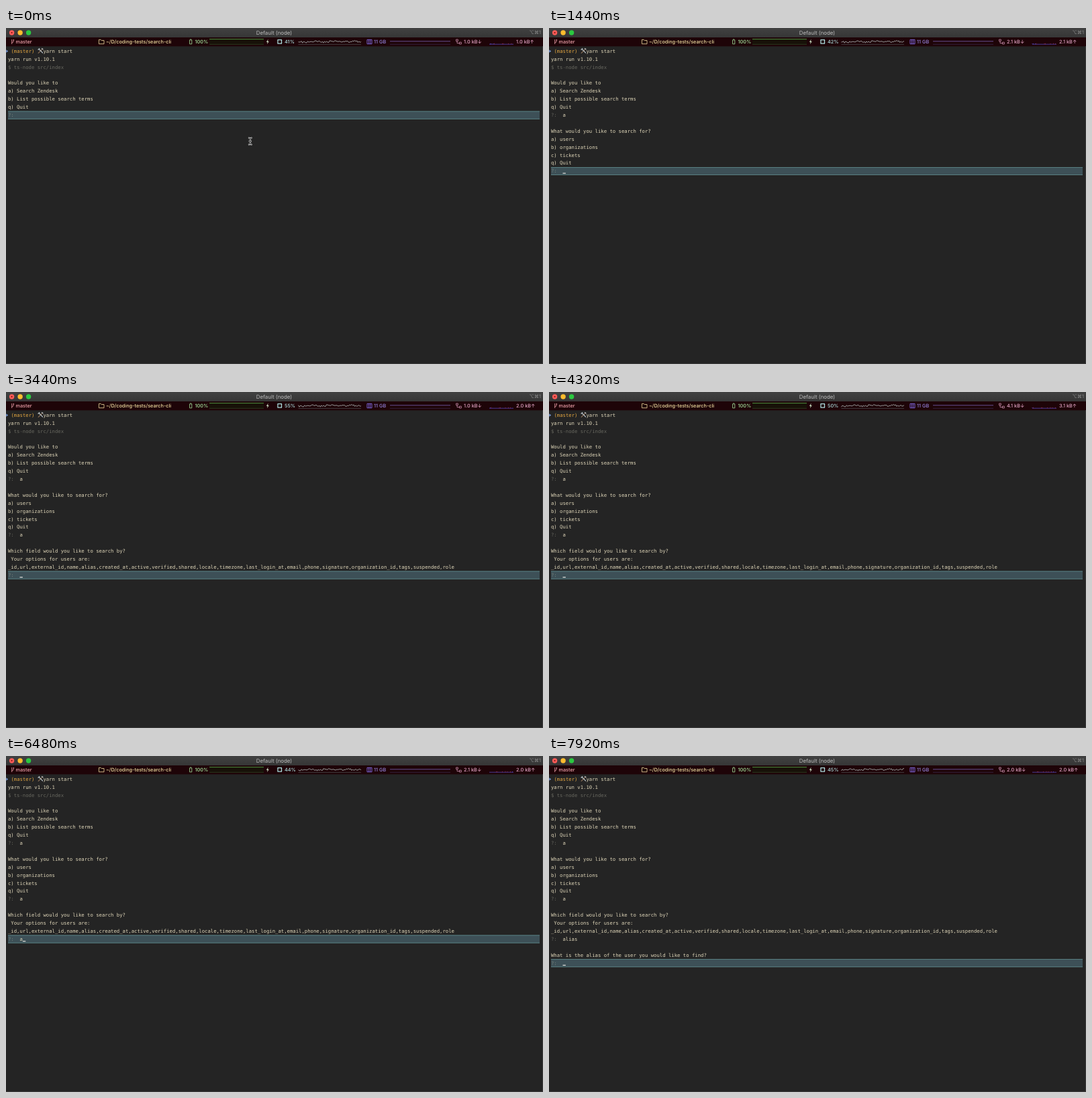
Animation, 800 px wide and 500 px high, one loop 8 s. Source, as an HTML page:

```html
<!DOCTYPE html>
<html lang="en">
<head>
<meta charset="utf-8">
<title>Terminal</title>
<style>
  html, body { margin: 0; width: 100%; height: 100%; overflow: hidden; background: #242424; }
  svg { display: block; width: 800px; height: 500px; }
  text { white-space: pre; text-rendering: geometricPrecision; }
  .mono { font: 7.27px "DejaVu Sans Mono", monospace; fill: #ded5b8; }
  .ui { font: 500 7.3px Inter, "DejaVu Sans", sans-serif; }
  .mono.dim { fill: #67675f; }
  .line { fill: none; stroke-width: .8; }
</style>
</head>
<body>
<svg id="stage" viewBox="0 0 800 500"></svg>
<script>
const LOOP = 8000, CHAR = 4.376, ROW = 11.9, LEFT = 3;
const NS = 'http://www.w3.org/2000/svg';
const stage = document.getElementById('stage');

function add(tag, attrs, text, parent = stage) {
  const el = document.createElementNS(NS, tag);
  for (const k in attrs) el.setAttribute(k, attrs[k]);
  if (text) el.textContent = text;
  parent.appendChild(el);
  return el;
}
const rect = (x, y, width, height, fill) => add('rect', { x, y, width, height, fill });
const path = (d, stroke, width = .8) =>
  add('path', { d, stroke, class: 'line', style: `stroke-width:${width}` });
const label = (x, text, fill) => add('text', { x, y: 23.3, fill, class: 'ui' }, text);
const baseline = row => 36.8 + row * ROW;
const mono = (row, text, parent, cls = '', x = LEFT) =>
  add('text', { x, y: baseline(row), class: 'mono ' + cls }, text, parent);
const show = (el, on) => { el.style.display = on ? '' : 'none'; };
const noise = n => {
  const v = Math.sin(n * 127.1 + 11.7) * 43758.5453;
  return v - Math.floor(v);
};

// Window
rect(0, 0, 800, 500, '#242424');
add('linearGradient', { id: 'bar', x2: 0, y2: 1 }).innerHTML =
  '<stop stop-color="#414141"/><stop offset="1" stop-color="#363636"/>';
rect(0, 0, 800, 14, 'url(#bar)');
rect(0, 14, 800, 13.3, '#1e0408');
rect(799, 27, 1, 473, '#3a3a3a');
rect(0, 499, 800, 1, '#3a3a3a');
['#fc5b57', '#fdbc2e', '#2bc840'].forEach((fill, i) =>
  add('circle', { cx: 8.6 + i * 12.5, cy: 7, r: 3.7, fill }));
add('circle', { cx: 8.6, cy: 7, r: 1.1, fill: '#7c1511' });
add('text', { x: 399.5, y: 9.8, fill: '#bdbdbd', class: 'ui', 'text-anchor': 'middle',
  style: 'font-size:7.9px;font-weight:400' }, 'Default (node)');
add('text', { x: 797, y: 9.4, fill: '#8c8c8c', class: 'ui', 'text-anchor': 'end',
  style: 'font-weight:400' }, '⌥⌘1');

// Status bar
const pink = '#f0a3ab', gold = '#f0dfa0', green = '#a4e59c', teal = '#abdcdc',
  violet = '#9583dc', rose = '#e2a4c4';
path('M8.7 17v7M8.7 22q2.6 0 2.6-3.6', pink);
add('circle', { cx: 11.3, cy: 17.9, r: .8, fill: pink });
label(14.5, 'master', pink);
path('M138.4 17.4h2.8l1 1.1h3.8v5.2h-7.6z', gold);
label(149, '~/D/coding-tests/search-cli', gold);
path('M273.6 17.8h3.2v6h-3.2zM274.5 16.8h1.4', green);
label(281.5, '100%', green);
rect(303, 16.5, 81, 8, '#171108');
path('M303 16.6H384', '#5cae4c');
path('M303 24.3H384', '#37552b', .6);
add('path', { d: 'M390.6 16.6l-2.7 4.3h1.8l-.8 3.4 2.9-4.5h-1.9z', fill: '#c9dcc0' });
path('M405 17.6h5.4v5.6h-5.4z', teal, 1.2);
path('M403.8 19h1M403.8 21.8h1M410.6 19h1M410.6 21.8h1', teal, .6);
const cpu = label(415, '', teal);
path('M435.5 24.4H529', '#596262', .6);
const cpuLine = path('', '#b9c6c4', .8);
path('M538 17.4h7v6.3h-7zM540.4 17.4v6.3M542.7 17.4v6.3', '#7860cf', 1);
label(548, '11 GB', violet);
path('M572 19.8H662', '#7663b5', .8);
path('M572 24.3H662', '#40355f', .6);
path('M670.6 17h2.7v2.7h-2.7zM675.5 21.2h2.8v2.7h-2.8zM672 19.8v2.8h3.4', rose, .7);
const down = label(682, '', rose);
path('M720 24.2H756', '#5547b8', .8);
const netBlue = path('', '#5c50d2', .7);
const netRed = path('', '#a53050', .7);
const up = label(760, '', rose);

// [start, cpu %, kB down, kB up]
const stats = [
  [0, 41, '1.0', '1.0'], [720, 42, '2.1', '2.1'], [1760, 48, '2.0', '1.0'],
  [2720, 55, '1.0', '2.0'], [3760, 50, '4.1', '3.1'], [4720, 41, '2.0', '2.0'],
  [5760, 44, '2.1', '2.0'], [6720, 46, '1.0', '1.0'], [7760, 45, '2.0', '2.0']
];

function drawStats(n) {
  const [, load, rx, tx] = stats[n];
  cpu.textContent = load + '%';
  down.textContent = rx + ' kB↓';
  up.textContent = tx + ' kB↑';
  const pts = [], blue = [], red = [];
  for (let i = 0; i <= 60; i++) {
    const k = i + n;
    const y = 20.2 + Math.sin(k * .33) * .7 + (noise(k) - .5) * 2.8;
    pts.push(`${(435.5 + i * 1.558).toFixed(2)} ${y.toFixed(2)}`);
  }
  for (let i = 0; i < 24; i++) {
    const h = noise(i + n + 90), x = 720 + i * 1.5;
    if (h > .72) (h > .88 ? red : blue).push(`M${x} 24v-${(h * 1.3).toFixed(2)}`);
  }
  cpuLine.setAttribute('d', 'M' + pts.join('L'));
  netBlue.setAttribute('d', blue.join(''));
  netRed.setAttribute('d', red.join(''));
}

// Shell prompt
add('path', { d: 'M.3 32.2l2.9 2.3-2.9 2.3z', fill: '#7898d6' });
add('text', { x: 7.4, y: baseline(0), class: 'mono', style: 'fill:#e0a441' }, '(master)');
path('M55 30.8L47.8 37.6', '#8a6e56', 1.3);
path('M49 31.2L55 37.4', '#b4bcc0', 1.3);
path('M47.6 32.4l2.6-2.2M53 30.2l2.4 1.8', '#b4bcc0', 1.3);
mono(0, 'yarn start', stage, '', 55.4);
mono(1, 'yarn run v1.10.1');
mono(2, '$ ts-node src/index', stage, 'dim');

// Input bar
const bar = add('g', {});
add('rect', { x: 3, y: 0, width: 792, height: 12, fill: '#3d5057' }, '', bar);
add('rect', { x: 3, y: 0, width: 792, height: .8, fill: '#5f8a8d' }, '', bar);
add('rect', { x: 3, y: 11.2, width: 792, height: .8, fill: '#5f8a8d' }, '', bar);

const fields = '_id,url,external_id,name,alias,created_at,active,verified,shared,locale,' +
  'timezone,last_login_at,email,phone,signature,organization_id,tags,suspended,role';
const screens = [
  [4, 'Would you like to', 'a) Search Zendesk', 'b) List possible search terms', 'q) Quit'],
  [10, 'What would you like to search for?', 'a) users', 'b) organizations', 'c) tickets', 'q) Quit'],
  [17, 'Which field would you like to search by?', ' Your options for users are:', fields],
  [22, 'What is the alias of the user you would like to find?']
].map(([row, ...lines]) => {
  const group = add('g', {});
  lines.forEach((s, i) => mono(row + i, s, group));
  const ask = row + lines.length;
  return {
    group, ask,
    mark: mono(ask, '?:', group, 'dim'),
    answer: mono(ask, '', group, '', LEFT + 4 * CHAR)
  };
});

const caret = rect(0, 0, CHAR, 1.1, '#f0f0ea');

// Mouse pointer
const pointer = add('g', { fill: 'none', 'stroke-linecap': 'round' });
for (const [stroke, w] of [['#e4e4e4', 2], ['#1c1c1c', .8]])
  add('path', { d: 'M361.8 163.6q2 0 2 1.8q0-1.8 2-1.8M363.8 165v7M361.8 173.4q2 0 2-1.8q0 1.8 2 1.8M362.6 168.6h2.4',
    stroke, 'stroke-width': w }, '', pointer);

// [time, key]
const keys = [
  [640, 'a'], [1040, '\n'], [2720, 'a'], [3120, '\n'],
  [6480, 'a'], [6640, 'l'], [6720, 'i'], [6880, 'a'], [7040, 's'], [7840, '\n']
];
const BLINK = 500;
let lastStat = -1;

function draw(t) {
  const n = stats.filter(s => s[0] <= t).length - 1;
  if (n !== lastStat) drawStats(lastStat = n);

  const pressed = keys.filter(k => k[0] <= t);
  const answers = pressed.map(k => k[1]).join('').split('\n');
  const current = answers.length - 1;
  screens.forEach((s, i) => {
    show(s.group, i <= current);
    s.answer.textContent = answers[i] || '';
    s.mark.style.fill = i === current ? '#77817c' : '';
  });

  const { ask } = screens[current];
  bar.setAttribute('transform', `translate(0 ${(28.5 + ask * ROW).toFixed(2)})`);
  caret.setAttribute('x', LEFT + (4 + answers[current].length) * CHAR);
  caret.setAttribute('y', baseline(ask) + .3);
  const lastKey = pressed.length ? pressed[pressed.length - 1][0] : -560;
  show(caret, (t - lastKey) % (2 * BLINK) < BLINK);
  show(pointer, !pressed.length);
}

const start = performance.now();
function tick(now) {
  draw(Math.max(0, now - start) % LOOP);
  requestAnimationFrame(tick);
}
draw(0);
requestAnimationFrame(tick);
</script>
</body>
</html>
```
